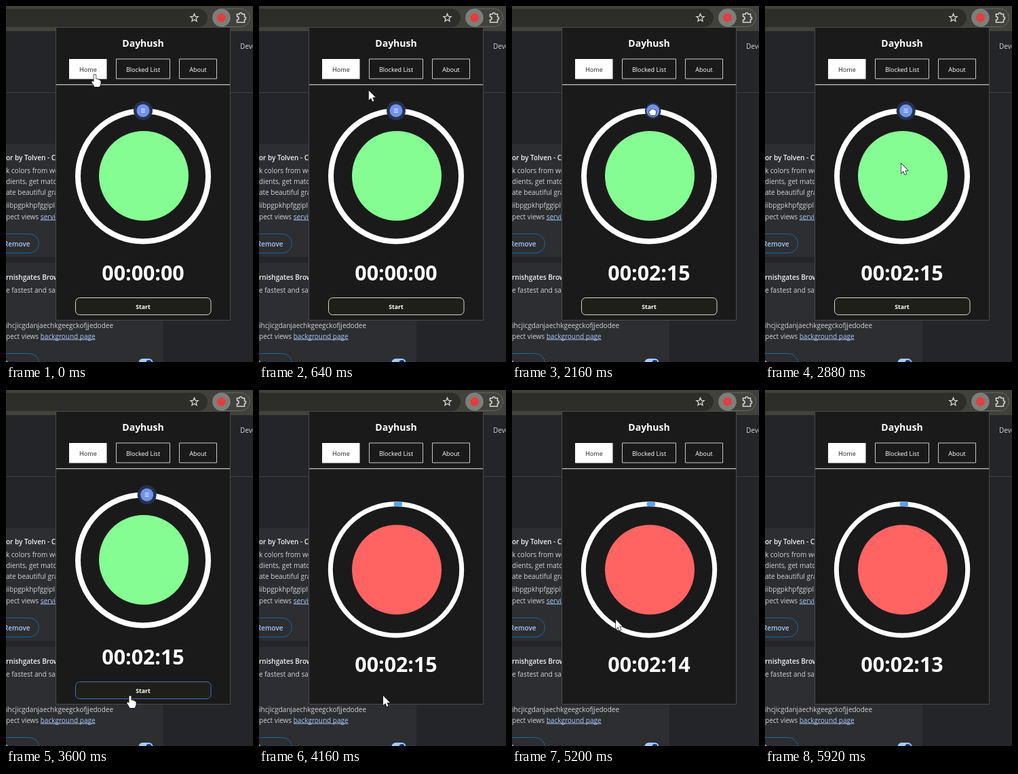
Recreate the animation shown at these times as an HTML page with a canvas. Size 364 by 524 pixels, loop 6 s.

```html
<!DOCTYPE html>
<html lang="en">
<head>
<meta charset="utf-8">
<title>Focus timer</title>
<style>
html, body { margin: 0; width: 100%; height: 100%; overflow: hidden; background: #242528; }
canvas { display: block; width: 364px; height: 524px; }
</style>
</head>
<body>
<canvas id="stage"></canvas>
<script>
const W = 364, H = 524, LOOP = 6000;
const FONT = '"Open Sans", "Noto Sans", sans-serif';
const BODY = '#d0d2d6', LINK = '#a8c7fa';
const canvas = document.getElementById('stage');
const ctx = canvas.getContext('2d');
const dpr = window.devicePixelRatio || 1;
canvas.width = W * dpr;
canvas.height = H * dpr;

const START = 3920;                // Start is pressed
const DRAG = [1360, 2160];         // knob is dragged
const TOTAL = 4 * 3600;            // seconds in a full turn
const SET = 135;

// Pointer path: time, x, y
const PATH = [
  [0, 131, 101], [240, 131, 101], [1120, 202, 155], [1360, 202, 155],
  [2160, 207, 155], [2640, 207, 155], [3360, 183, 450], [4240, 183, 450],
  [4720, 153, 338], [5200, 153, 338], [5760, 80, 462]
];

const clamp = v => Math.max(0, Math.min(1, v));
const smooth = v => v * v * (3 - 2 * v);

function pointerAt(t) {
  for (let i = 1; i < PATH.length; i++) {
    const [t0, x0, y0] = PATH[i - 1], [t1, x1, y1] = PATH[i];
    if (t <= t1) {
      const k = smooth((t - t0) / (t1 - t0));
      return [x0 + (x1 - x0) * k, y0 + (y1 - y0) * k];
    }
  }
  return null;
}

function fillRect(x, y, w, h, color) {
  ctx.fillStyle = color;
  ctx.fillRect(x, y, w, h);
}

function box(x, y, w, h, r, fill, stroke, line = 1) {
  ctx.beginPath();
  ctx.roundRect(x, y, w, h, r);
  if (fill) { ctx.fillStyle = fill; ctx.fill(); }
  if (stroke) { ctx.strokeStyle = stroke; ctx.lineWidth = line; ctx.stroke(); }
}

function disc(x, y, r, color) {
  ctx.beginPath();
  ctx.arc(x, y, r, 0, 7);
  ctx.fillStyle = color;
  ctx.fill();
}

function arc(x, y, r, from, to, width, color) {
  ctx.beginPath();
  ctx.arc(x, y, r, from, to);
  ctx.strokeStyle = color;
  ctx.lineWidth = width;
  ctx.lineCap = 'round';
  ctx.stroke();
  ctx.lineCap = 'butt';
}

function text(str, x, y, size, color, weight = 400, align = 'left') {
  ctx.font = `${weight} ${size}px ${FONT}`;
  ctx.textAlign = align;
  ctx.fillStyle = color;
  ctx.fillText(str, x, y);
  return ctx.measureText(str).width;
}

function link(lead, str, y) {
  const x = text(lead, 0, y, 10, BODY);
  const w = text(str, x, y, 10, LINK);
  fillRect(x, y + 1, w, 1, LINK);
}

function star(cx, cy) {
  ctx.beginPath();
  for (let i = 0; i < 10; i++) {
    const r = i % 2 ? 2.7 : 6, a = i * Math.PI / 5 - Math.PI / 2;
    ctx.lineTo(cx + r * Math.cos(a), cy + r * Math.sin(a));
  }
  ctx.closePath();
  ctx.strokeStyle = '#d4d6d8';
  ctx.lineWidth = 1.3;
  ctx.stroke();
}

function puzzle(x, y) {
  ctx.strokeStyle = '#d4d6d8';
  ctx.lineWidth = 1.6;
  ctx.stroke(new Path2D(`M${x} ${y}h3.5a2 2 0 0 1 4 0h3.5v4a2 2 0 0 1 0 4v4h-11v-3.5a2.4 2.4 0 0 0 0-5z`));
}

function removeButton(y) {
  box(-30, y - .5, 78.5, 28, 14, null, '#1767a8');
  text('Remove', 35.5, y + 17.5, 10, LINK, 600, 'right');
}

function drawPage() {
  fillRect(0, 0, W, H, '#242528');
  fillRect(0, 0, W, 37, '#41423c');
  box(-40, 4, 337, 27, 13.5, '#2d2e29');
  star(277.5, 17.5);
  box(304.5, 4, 55, 26.5, 13.25, null, '#686964');
  disc(317.5, 17.2, 13.2, '#7e7e7b');
  disc(317.5, 17, 6.5, '#e0403f');
  puzzle(340.5, 12);

  text('Developer mode', 345, 63, 10, BODY);
  fillRect(0, 127, W, 1, '#3d3f43');

  box(-20, 203, 252, 166, 5, '#2d2e31');
  box(-20, 378, 252, 180, 5, '#2d2e31');
  text('or by Tolven - C', 0, 227, 10, '#f0f1f2', 600);
  const lines = ['k colors from web', 'dients, get match', 'ate beautiful grad'];
  lines.forEach((s, i) => text(s, 0, 246 + 16 * i, 10, BODY));
  text('iibpgpkhpfggipl', 0, 297, 10, BODY);
  link('pect views ', 'service', 313.5);
  removeButton(336);

  text('rnishgates Brow', 0, 403, 10, '#f0f1f2', 600);
  text('e fastest and safe', 0, 422, 10, BODY);
  text('ihcjicgdanjaechkgeegckofjjedodee', 0, 473.5, 10, BODY);
  link('pect views ', 'background page', 489.5);
  removeButton(512);
  box(195.5, 519, 21, 12, 6, LINK);
  disc(210.5, 525, 4, '#0b3d7c');
}

function drawPopup() {
  box(73.5, 31.5, 257, 431, 0, '#1a1a1a', '#4a4b4c');
  text('Dayhush', 202, 60, 14, '#fff', 700, 'center');
  box(93, 78, 55.5, 29.5, 0, '#fff');
  box(162.5, 78, 79, 29, 0, null, '#c9c9c9');
  box(255.5, 78, 55, 29, 0, null, '#c9c9c9');
  text('Home', 121, 96.5, 9.1, '#222', 400, 'center');
  text('Blocked List', 202, 96.5, 9.1, '#fff', 400, 'center');
  text('About', 283, 96.5, 9.1, '#fff', 400, 'center');
  fillRect(74, 115, 256, 1.5, '#a9a9a9');
}

function clock(seconds, y) {
  const pad = n => String(n).padStart(2, '0');
  text(`00:${pad(Math.floor(seconds / 60))}:${pad(seconds % 60)}`, 202, y, 30.4, '#fff', 700, 'center');
}

function drawSetup(t) {
  const drag = clamp((t - DRAG[0]) / (DRAG[1] - DRAG[0]));
  const a = smooth(drag) * SET / TOTAL * 2 * Math.PI;
  arc(202, 250.5, 96, 0, 7, 8, '#fff');
  disc(203, 250, 66, '#85fd93');

  const x = 202 + 96.5 * Math.sin(a), y = 250.5 - 96.5 * Math.cos(a);
  const held = t >= 1200 && t < 2560;
  const pulse = held ? .9 + .1 * Math.cos((t - 1200) / 1500 * 2 * Math.PI) : 1;
  disc(x, y, 14 * pulse, '#26324d');
  disc(x, y, 9.5, '#7193ee');
  for (let i = -1; i < 2; i++) fillRect(x - 3, y + i * 2.4 - .5, 6, 1, '#e8eeff');

  clock(Math.floor(smooth(drag) * 3) * 45, 403.5);
  const hover = t >= 3280;
  box(102.5, 429.5, 199.5, 25, 6, '#1f1f1a', hover ? '#4f69bd' : '#d6d6d2');
  text('Start', 202, 445.5, 8.7, '#fff', 700, 'center');
}

function drawRunning(t) {
  arc(202, 264.5, 96.7, 0, 7, 7, '#fff');
  const top = -Math.PI / 2;
  arc(202, 264.5, 96.7, top, top + SET / TOTAL * 2 * Math.PI, 7, '#5aa2e6');
  disc(203, 264.5, 66, '#ff6463');
  clock(SET - (t >= 4800) - (t >= 5920), 415);
}

const SHAPES = {
  arrow: 'M0 0V14L3.2 11L5.4 16L7.6 15L5.5 10.2H10Z',
  point: 'M-1.5 1Q0-1 1.5 1V7Q3 5.5 4.2 7.4Q5.8 6.5 6.6 8.3Q8.6 8 8.6 10V13Q8 16 6.5 18H-.5Q-2 15-4.4 11.6Q-5 9-3 9.6L-1.5 11Z',
  open: 'M-3 8Q-4 5-6 3.2Q-6-.2-3.8 1.4L-4-3Q-3-5-2-3L-1.6-1V-4.5Q-.3-6.5.8-4.5V-1L1.4-4Q2.8-5.3 3.4-3.5V0Q4.8-3.5 5.9-1.2Q6 4 4 8Z',
  fist: 'M-3 6Q-3 4-5 2Q-5.5-1-3.5-.2Q-3.5-3.5-1.4-2.4Q0-4 1-2.4Q3-3.4 3.5-1.7Q5.5-2 5.4 1Q5 4 3.8 6Z'
};

function shapeAt(t, y) {
  if (t < 1200) return y < 107 ? 'point' : 'arrow';
  if (t < DRAG[0]) return 'open';
  if (t < 2480) return 'fist';
  if (t < 2640) return 'open';
  return y > 430 && t < START ? 'point' : 'arrow';
}

function drawPointer(t) {
  const p = pointerAt(t);
  if (!p) return;
  ctx.save();
  ctx.translate(p[0], p[1]);
  const path = new Path2D(SHAPES[shapeAt(t, p[1])]);
  ctx.lineJoin = 'round';
  ctx.lineWidth = 1.4;
  ctx.strokeStyle = '#111';
  ctx.stroke(path);
  ctx.fillStyle = '#fff';
  ctx.fill(path);
  ctx.restore();
}

function draw(now) {
  const t = now % LOOP;
  ctx.setTransform(dpr, 0, 0, dpr, 0, 0);
  drawPage();
  drawPopup();
  if (t < START) drawSetup(t);
  else drawRunning(t);
  drawPointer(t);
}

const begin = performance.now();
function tick() {
  draw(performance.now() - begin);
  requestAnimationFrame(tick);
}
tick();
</script>
</body>
</html>
```
